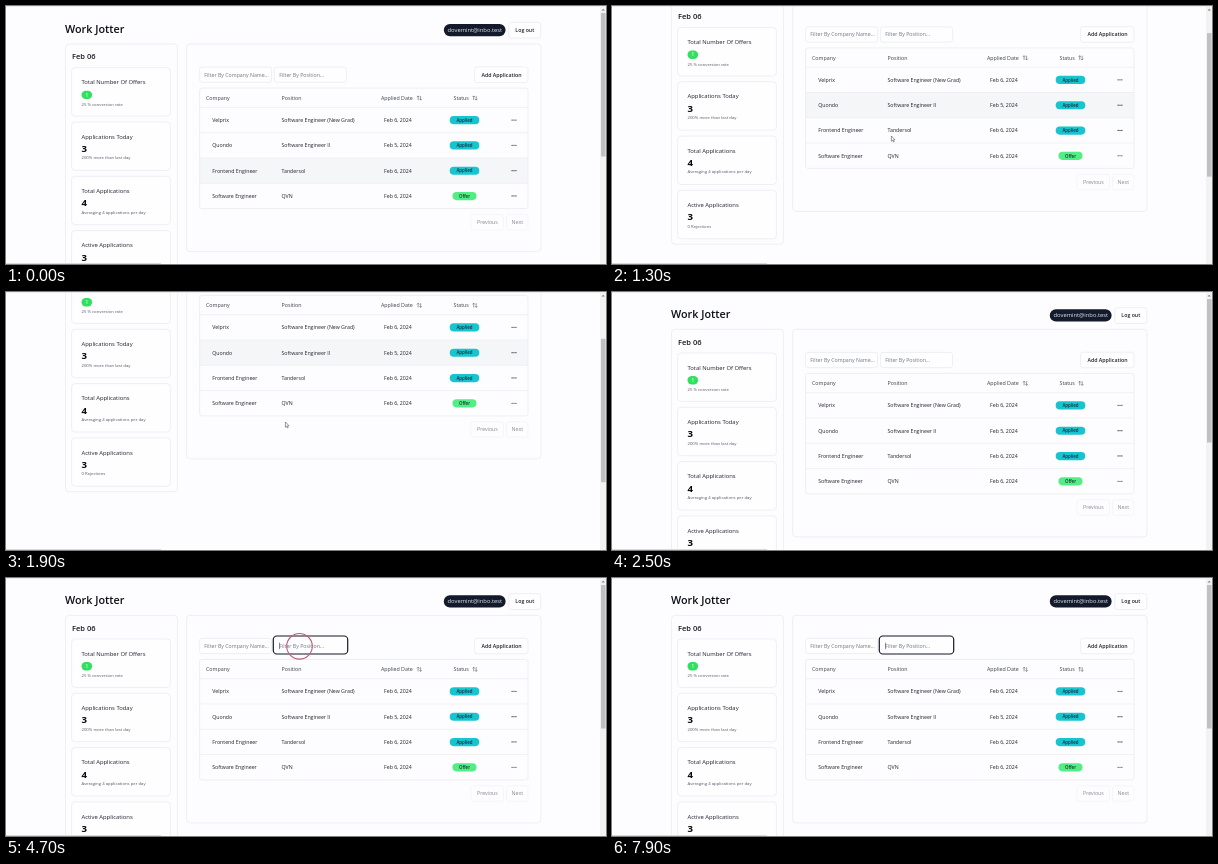
Recreate the animation shown at these times as an HTML page with a canvas. Size 600 by 258 pixels, loop 8 s.

```html
<!DOCTYPE html>
<html lang="en">
<head>
<meta charset="utf-8">
<title>Work Jotter</title>
<style>
  html, body { margin: 0; width: 100%; height: 100%; overflow: hidden; background: #fdfcfe; }
  canvas { display: block; width: 600px; height: 258px; }
</style>
</head>
<body>
<canvas id="stage"></canvas>
<script>
const LOOP = 8000;
const BG = '#fdfcfe', PLATE = '#fefdff', LINE = '#e9eaef', FAINT = '#f3f3f6';
const INK = '#20242c', HEAD = '#3c424c', MUTED = '#6f7682';
const TEAL = '#17c5d1', GREEN = '#52ee83';
const ROW_H = 25.3, TABLE_TOP = 100.7;

const canvas = document.getElementById('stage');
const ctx = canvas.getContext('2d');
const dpr = window.devicePixelRatio || 1;
canvas.width = 600 * dpr;
canvas.height = 258 * dpr;

const cards = [
  { title: 'Total Number Of Offers', pill: '1', note: '25 % conversion rate' },
  { title: 'Applications Today', value: '3', note: '200% more than last day' },
  { title: 'Total Applications', value: '4', note: 'Averaging 4 applications per day' },
  { title: 'Active Applications', value: '3', note: '0 Rejections' }
];

// keep: longest typed filter that still shows the row
const rows = [
  { company: 'Velprix', position: 'Software Engineer (New Grad)', date: 'Feb 6, 2024', status: 'Applied', keep: 8 },
  { company: 'Quondo', position: 'Software Engineer II', date: 'Feb 5, 2024', status: 'Applied', keep: 8 },
  { company: 'Frontend Engineer', position: 'Tandersol', date: 'Feb 6, 2024', status: 'Applied', keep: 4 },
  { company: 'Software Engineer', position: 'QVN', date: 'Feb 6, 2024', status: 'Offer', keep: 0 }
];

const wideCols = { position: 275.5, dateHead: 375, date: 378, statusHead: 447.5, badge: 458.5, dots: 508 };
const tightCols = { position: 250.5, dateHead: 359.2, date: 362, statusHead: 438.8, badge: 453, dots: 506.8 };

const WORD = 'Software';
const typeTimes = [5200, 5500, 5800, 5850, 5900, 5970, 6040, 6100];
const eraseStart = 7000, eraseStep = 100;

function ease(t, from, to) {
  const u = Math.min(1, Math.max(0, (t - from) / (to - from)));
  return u * u * (3 - 2 * u);
}

function text(str, x, mid, size, color = INK, weight = 400, align = 'left') {
  ctx.font = `${weight} ${size}px "Open Sans", "Noto Sans", sans-serif`;
  ctx.textAlign = align;
  ctx.textBaseline = 'alphabetic';
  ctx.fillStyle = color;
  ctx.fillText(str, x, mid + size * 0.357);
}

function box(x, y, w, h, r, stroke, fill, width = 0.7) {
  ctx.beginPath();
  ctx.roundRect(x, y, w, h, r);
  if (fill) { ctx.fillStyle = fill; ctx.fill(); }
  if (stroke) { ctx.strokeStyle = stroke; ctx.lineWidth = width; ctx.stroke(); }
}

function path(points, color, width = 0.6) {
  ctx.beginPath();
  points.forEach(([x, y], i) => i ? ctx.lineTo(x, y) : ctx.moveTo(x, y));
  ctx.strokeStyle = color;
  ctx.lineWidth = width;
  ctx.stroke();
}

function scrollAt(t) {
  return -0.7 + 0.7 * ease(t, 900, 1000)
    + 39.5 * ease(t, 960, 1220) + 38.5 * ease(t, 1435, 1695)
    - 38.5 * ease(t, 1900, 2140) - 39.5 * ease(t, 2180, 2430);
}

function typedAt(t) {
  if (t >= eraseStart) {
    const gone = Math.floor((t - eraseStart) / eraseStep) + 1;
    return Math.max(0, WORD.length - gone);
  }
  return typeTimes.filter(k => t >= k).length;
}

function hoverAt(t) {
  if (t < 700) return 2;
  return t < 2000 ? 1 : -1;
}

function focusAt(t) {
  if (t >= 4700) return 'position';
  return t >= 3100 ? 'company' : '';
}

function header() {
  text('Work Jotter', 59, 22.6, 10.8, '#0d1017', 600);
  box(437.8, 17.2, 61.8, 12.3, 6.1, null, '#131a2c');
  text('dovemint@inbo.test', 468.8, 23.2, 5.8, '#e4e7ee', 400, 'center');
  box(502.8, 15.7, 32, 15.8, 2.4, LINE, PLATE);
  text('Log out', 518.8, 23.6, 5.24, INK, 600, 'center');
}

function sidebar() {
  box(59.5, 37.3, 112, 240.4, 3.5, LINE);
  text('Feb 06', 66, 50, 7.5, '#14181f', 600);
  cards.forEach((card, i) => {
    const y = 61 + i * 54.3;
    box(65.6, y, 98.8, 48.4, 3.5, LINE, PLATE);
    text(card.title, 75.5, y + 14.6, 5.86);
    if (card.pill) {
      box(75.5, y + 23, 10.6, 8.4, 4.2, null, '#2fe15e');
      text(card.pill, 80.8, y + 27.2, 4.5, '#eafff0', 600, 'center');
    } else {
      text(card.value, 75.5, y + 26.5, 9.6, '#07090d', 700);
    }
    text(card.note, 75.5, y + (card.pill ? 36.5 : 35.8), 4.25, '#565b64');
  });
}

function input(x, hint, value, focused) {
  if (focused) box(x - 1.2, 58, 74.4, 18, 3.6, '#161a26', PLATE, 1.2);
  else box(x, 60.4, 72, 15.2, 2.4, LINE, PLATE);
  ctx.save();
  ctx.beginPath();
  ctx.rect(x, 60, 69.2, 16);
  ctx.clip();
  text(value || hint, x + 4.7, 68, 5.24, value ? INK : MUTED);
  const caret = x + 5 + (value ? ctx.measureText(value).width : 0);
  if (focused) path([[caret, 64.6], [caret, 71.2]], INK, 0.5);
  ctx.restore();
}

function sortIcon(x, y) {
  const up = x + 1.3, down = x + 3.8;
  path([[up, y + 2.1], [up, y - 2.1], [up - 1.2, y - 0.9]], HEAD, 0.5);
  path([[up, y - 2.1], [up + 1.2, y - 0.9]], HEAD, 0.5);
  path([[down, y - 2.1], [down, y + 2.1], [down - 1.2, y + 0.9]], HEAD, 0.5);
  path([[down, y + 2.1], [down + 1.2, y + 0.9]], HEAD, 0.5);
}

function tableRow(row, y, cols, hovered) {
  const mid = y + ROW_H / 2;
  if (hovered) {
    ctx.fillStyle = '#f4f6f7';
    ctx.fillRect(194, y, 327.6, ROW_H);
  }
  path([[193.6, y], [522, y]], LINE);
  text(row.company, 206.2, mid, 5.24);
  text(row.position, cols.position, mid, 5.24);
  text(row.date, cols.date, mid, 5.24);
  const offer = row.status === 'Offer', w = offer ? 24 : 29.6;
  box(cols.badge - w / 2, mid - 4, w, 8.2, 4.1, null, offer ? GREEN : TEAL);
  text(row.status, cols.badge, mid + 0.2, 4.4, '#12323a', 600, 'center');
  ctx.fillStyle = INK;
  for (let k = -1; k <= 1; k++) {
    ctx.beginPath();
    ctx.arc(cols.dots + k * 1.9, mid, 0.6, 0, 7);
    ctx.fill();
  }
}

function mainPanel(t) {
  const typed = typedAt(t), focus = focusAt(t), hover = hoverAt(t);
  const shown = rows.filter(r => r.keep >= typed);
  const cols = shown.length > 2 ? wideCols : tightCols;
  const bottom = TABLE_TOP + shown.length * ROW_H;

  box(180.6, 37.3, 354.4, bottom + 43 - 37.3, 3.5, LINE);
  input(193.6, 'Filter By Company Name...', '', focus === 'company');
  input(268.5, 'Filter By Position...', WORD.slice(0, typed), focus === 'position');
  box(468.6, 60.2, 53.4, 15.6, 2.4, LINE, PLATE);
  text('Add Application', 495.5, 68, 5.28, INK, 600, 'center');

  text('Company', 200, 91.3, 5.3, HEAD);
  text('Position', cols.position, 91.3, 5.3, HEAD);
  text('Applied Date', cols.dateHead, 91.3, 5.3, HEAD);
  sortIcon(cols.dateHead + 35.8, 91.3);
  text('Status', cols.statusHead, 91.3, 5.3, HEAD);
  sortIcon(cols.statusHead + 18.9, 91.3);
  shown.forEach((row, i) => tableRow(row, TABLE_TOP + i * ROW_H, cols, hover === i));
  box(193.6, 81.4, 328.4, bottom - 81.4, 2.4, LINE);

  const mid = bottom + 13.6;
  box(465, mid - 7.8, 32.6, 15.6, 2.4, FAINT);
  text('Previous', 481.4, mid, 5.24, '#868b94', 400, 'center');
  box(500.6, mid - 7.8, 21.4, 15.6, 2.4, FAINT);
  text('Next', 511.3, mid, 5.24, '#868b94', 400, 'center');
}

function clickRing(t, start, x, y) {
  const u = (t - start) / 320;
  if (u < 0 || u >= 1) return;
  ctx.globalAlpha = 1 - u * u;
  ctx.beginPath();
  ctx.arc(x, y, 12.8, 0, Math.PI * 2);
  ctx.strokeStyle = '#bb6177';
  ctx.lineWidth = 1.1;
  ctx.stroke();
  ctx.globalAlpha = 1;
}

function pointer(t) {
  if (t < 400 || t > 2200) return;
  const arrive = ease(t, 400, 900), leave = ease(t, 1900, 2300);
  const x = 292 - 12.6 * arrive - 46 * leave;
  const y = 164 - 34 * arrive - 62 * leave;
  const shape = [[0, 0], [0, 5.2], [1.2, 4.2], [2, 5.9], [2.8, 5.5], [2, 3.9], [3.6, 3.8]];
  ctx.beginPath();
  shape.forEach(([dx, dy]) => ctx.lineTo(x + dx, y + dy));
  ctx.closePath();
  ctx.fillStyle = '#fff';
  ctx.fill();
  ctx.strokeStyle = '#33363c';
  ctx.lineWidth = 0.5;
  ctx.stroke();
}

function browserEdges(scroll) {
  ctx.fillStyle = '#e4e5e8';
  ctx.fillRect(0, 0, 600, 0.7);
  ctx.fillStyle = '#d9dade';
  ctx.fillRect(0, 257, 155, 1);
  ctx.fillStyle = '#f2f2f3';
  ctx.fillRect(594, 0.7, 6, 257.3);
  ctx.fillStyle = '#c1c1c3';
  ctx.fillRect(595, 7 + Math.max(0, scroll) * 0.51, 4.6, 143.5);
  ctx.fillStyle = '#7c7d80';
  ctx.beginPath();
  ctx.moveTo(595.6, 4.6);
  ctx.lineTo(597.2, 2.8);
  ctx.lineTo(598.8, 4.6);
  ctx.fill();
}

function draw(t) {
  const scroll = scrollAt(t);
  ctx.setTransform(dpr, 0, 0, dpr, 0, 0);
  ctx.fillStyle = BG;
  ctx.fillRect(0, 0, 600, 258);
  ctx.save();
  ctx.translate(0, -scroll);
  header();
  sidebar();
  mainPanel(t);
  ctx.restore();
  browserEdges(scroll);
  clickRing(t, 3100, 230, 68.3);
  clickRing(t, 4690, 293.5, 68.3);
  pointer(t);
}

const start = performance.now();
function tick() {
  draw((performance.now() - start) % LOOP);
  requestAnimationFrame(tick);
}
tick();
</script>
</body>
</html>
```
